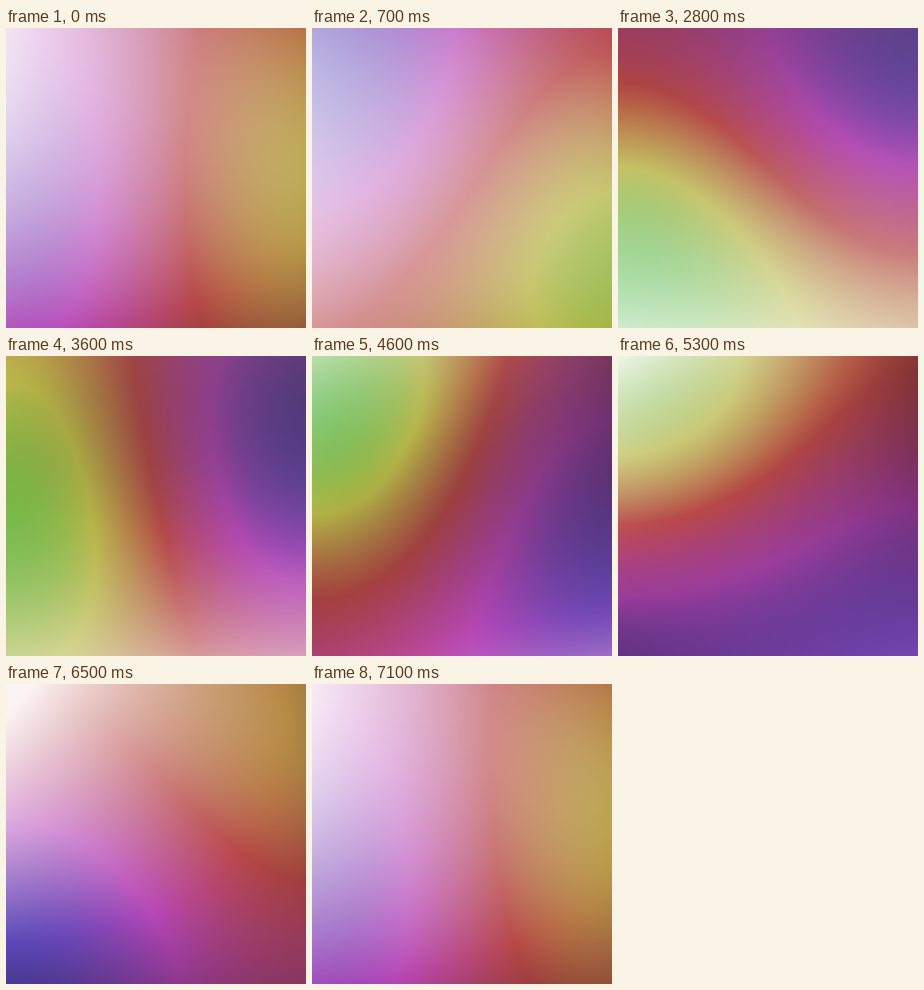
Animation, 300 px wide and 300 px high, one loop 7.2 s. Source, as an HTML page with a canvas:

```html
<!DOCTYPE html>
<html lang="en">
<head>
<meta charset="utf-8">
<title>Drifting gradient</title>
<style>
  html, body { margin: 0; height: 100%; overflow: hidden; }
  canvas { display: block; width: 100vw; height: 100vh; }
</style>
</head>
<body>
<canvas id="view" width="150" height="150"></canvas>
<script>
const LOOP = 7200, STEP = 100, SIZE = 150;

const ctx = document.getElementById('view').getContext('2d');
const image = ctx.createImageData(SIZE, SIZE);

// Hue in degrees, saturation and lightness from 0 to 1.
function putColor(offset, hue, sat, light) {
  const chroma = sat * Math.min(light, 1 - light);
  [0, 8, 4].forEach((n, channel) => {
    const k = (n + (hue + 360) / 30) % 12;
    image.data[offset + channel] =
      255 * (light - chroma * Math.max(-1, Math.min(k - 3, 9 - k, 1)));
  });
  image.data[offset + 3] = 255;
}

// Hue and lightness are tilted, twisted surfaces; each tilt swings once per loop.
function draw(time) {
  const turn = time / LOOP * 360;
  const swing = (mean, size, phase) =>
    mean + size * Math.cos((turn - phase) * Math.PI / 180);

  const hue = {
    base: swing(-9.5, 17, 131),
    across: swing(-9, 66, 14),
    down: swing(8.5, 77.5, 97),
    twist: swing(5, 15.5, 255)
  };
  const light = {
    base: swing(0.582, 0.08, 60),
    across: swing(-0.089, 0.06, 155),
    down: swing(0.011, 0.19, 133),
    twist: swing(0.062, 0.115, 275),
    bend: swing(0.01, 0.115, 211)
  };
  const fade = Math.max(0, swing(0, 0.1, 180));

  for (let y = 0; y < SIZE; y++) {
    const v = (y + 0.5) / SIZE * 2 - 1;
    const sv = Math.sin(v * Math.PI / 2);
    const bulge = 0.8 + 0.45 * Math.cos(v * Math.PI / 2);
    for (let x = 0; x < SIZE; x++) {
      const u = (x + 0.5) / SIZE * 2 - 1;
      const su = Math.sin(u * Math.PI / 2);
      const h = hue.base + hue.across * su * bulge + hue.down * sv + hue.twist * su * sv;
      const l = light.base + light.across * u + light.down * v
        + light.twist * u * v + light.bend * (v * v - 2 / 3);
      const s = 0.44 - fade * (1 + u) * (1 - v) / 4;
      putColor((y * SIZE + x) * 4, h, s, Math.min(l, 0.97));
    }
  }
  ctx.putImageData(image, 0, 0);
}

const start = performance.now();
let shown = -1;
function tick() {
  const elapsed = (performance.now() - start) % LOOP;
  const time = Math.floor(elapsed / STEP) * STEP;
  if (time !== shown) draw(shown = time);
  requestAnimationFrame(tick);
}
tick();
</script>
</body>
</html>
```
